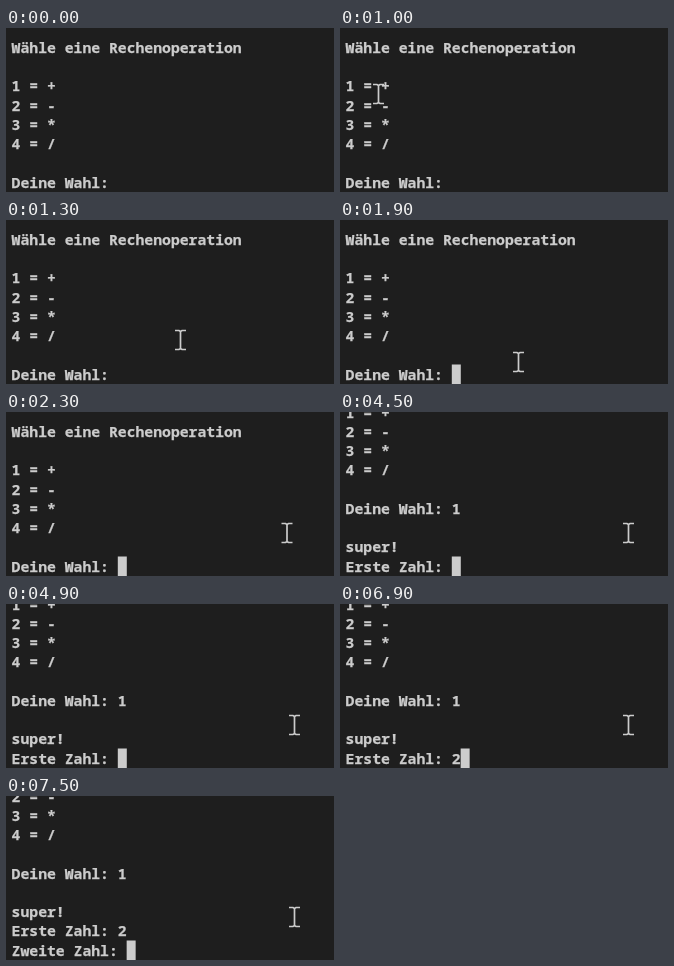
Write an HTML page that moves like this. It is 328 by 164 pixels and loops after 8000 ms.

```html
<!DOCTYPE html>
<html lang="de">
<head>
<meta charset="utf-8">
<title>Rechner</title>
<style>
  html, body { margin: 0; width: 100%; height: 100%; overflow: hidden; background: #1e1e1e; }
  svg { display: block; width: 100%; height: 100%; }
  text {
    font: 600 14.75px "Noto Sans Mono", "DejaVu Sans Mono", monospace;
    fill: #ccc; stroke: #ccc; stroke-width: .25; white-space: pre;
  }
</style>
</head>
<body>
<svg viewBox="0 0 328 164">
  <rect width="328" height="164" fill="#1e1e1e"/>
  <g id="screen"></g>
  <rect id="block" y="144.5" width="9" height="20" fill="#ccc"/>
  <path id="mouse" fill="none" stroke="#ccc" stroke-width="1.7"
    d="M-5.5 -9.5H-1.5L0 -8.5L1.5 -9.5H5.5M0 -8.5V8.5M-5.5 9.5H-1.5L0 8.5L1.5 9.5H5.5"/>
</svg>
<script>
const LOOP = 8000, STEP = 100;
const LEFT = 5.6, BASE = 24.8, PITCH = 19.27, ADVANCE = 8.85;
const MENU = ["Wähle eine Rechenoperation", "", "1 = +", "2 = -", "3 = *", "4 = /", ""];
const SHOWN = { mouse: 1000, block: 1700 };

const el = id => document.getElementById(id);
const screen = el("screen"), block = el("block"), mouse = el("mouse");

const rows = Array.from({ length: 12 }, (_, i) => {
  const row = document.createElementNS("http://www.w3.org/2000/svg", "text");
  row.setAttribute("x", LEFT);
  row.setAttribute("y", BASE + i * PITCH);
  return screen.appendChild(row);
});

function linesAt(t) {
  const lines = [...MENU, "Deine Wahl: " + (t >= 3500 ? "1" : "")];
  if (t >= 4500) lines.push("", "super!", "Erste Zahl: " + (t >= 6900 ? "2" : ""));
  if (t >= 7300) lines.push("Zweite Zahl: ");
  return lines;
}

// Eased progress from 0 to 1 between two times
function glide(t, from, to) {
  const k = Math.min(1, Math.max(0, (t - from) / (to - from)));
  return k * (2 - k);
}

// A sweep to the right, a dip with a small return, then a sweep aside and a nudge
function pointerAt(t) {
  const sweep = glide(t, 1000, 1300), dip = glide(t, 1300, 1500), back = glide(t, 1600, 1900);
  const aside = glide(t, 2000, 2300), nudge = glide(t, 2600, 2800);
  const x = 38.5 + 136 * sweep + 4 * dip + 102.5 * aside + 7.5 * nudge;
  const y = 66 + 54 * sweep + 31 * dip - 9 * back - 21 * aside;
  return `translate(${x} ${y})`;
}

function draw(time) {
  const t = Math.floor((time % LOOP) / STEP) * STEP;
  const lines = linesAt(t), last = lines.length - 1;
  rows.forEach((row, i) => { row.textContent = lines[i] || ""; });
  screen.setAttribute("transform", `translate(0 ${(MENU.length - last) * PITCH})`);

  block.setAttribute("x", LEFT + lines[last].length * ADVANCE);
  block.style.display = t >= SHOWN.block ? "" : "none";

  mouse.setAttribute("transform", pointerAt(t));
  mouse.style.display = t >= SHOWN.mouse ? "" : "none";
}

const start = performance.now();
function tick() {
  draw(performance.now() - start);
  requestAnimationFrame(tick);
}
tick();
</script>
</body>
</html>
```
